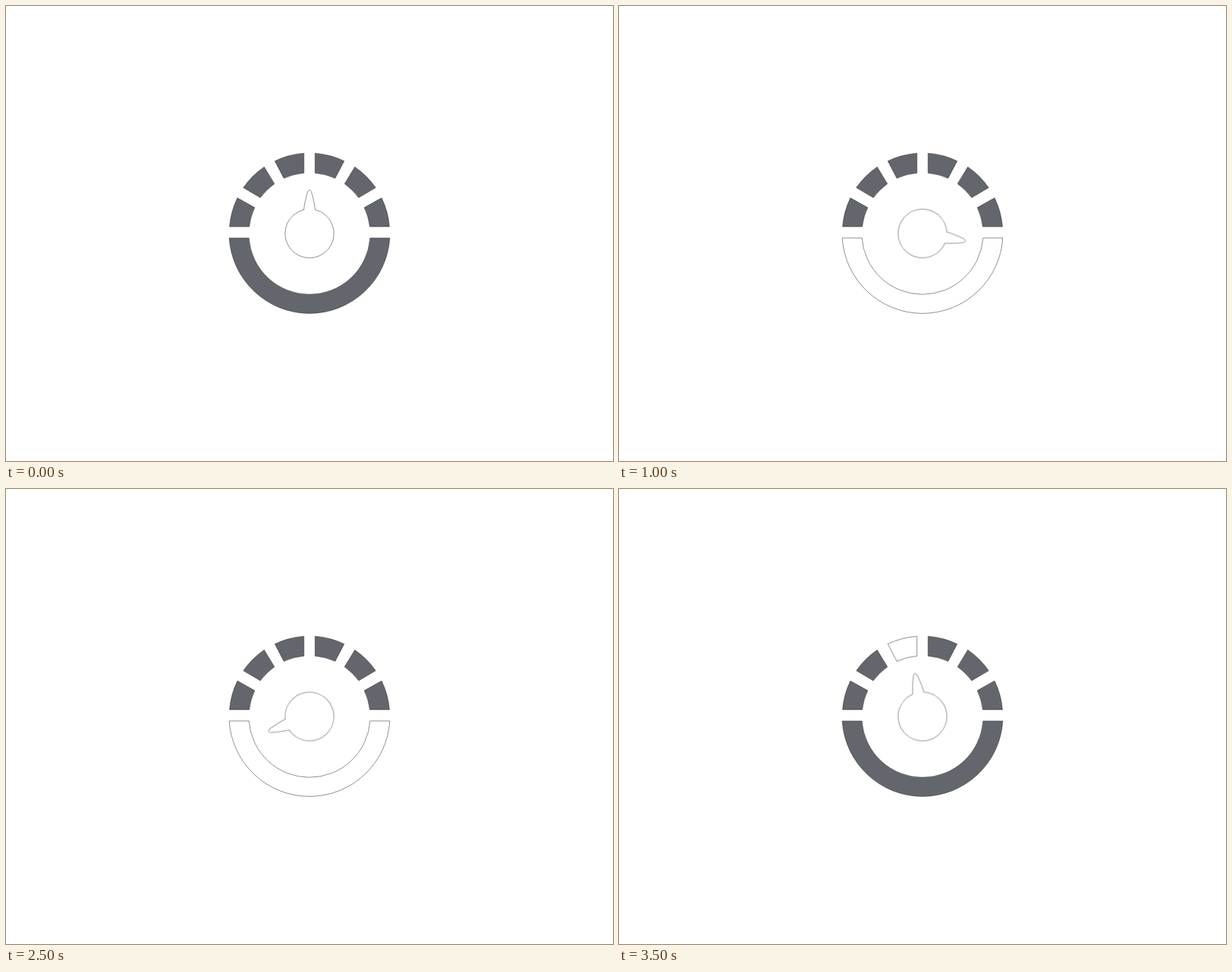
Recreate the animation shown at these times as an HTML page. Size 800 by 600 pixels, loop 3.6 s.

```html
<!DOCTYPE html>
<html lang="en">
<head>
<meta charset="utf-8">
<title>Dial</title>
<style>
  html, body { margin: 0; width: 100%; height: 100%; overflow: hidden; background: #fff; }
  svg { display: block; width: 800px; height: 600px; }
  path { stroke: #222; stroke-width: .5; }
  .part { fill: #64666d; }
  #knob { fill: #fff; }
</style>
</head>
<body>
<svg viewBox="-400 -300 800 600">
  <g id="ring"></g>
  <path id="knob" d="M-7.5 -31.2C-6.5 -40 -4 -50 -2.6 -54.5C-1.6 -58.2 1.6 -58.2 2.6 -54.5C4 -50 6.5 -40 7.5 -31.2A32.1 32.1 0 1 1 -7.5 -31.2Z"/>
</svg>
<script>
  const LOOP = 3600, STEPS = 36;
  const OUTER = 106, INNER = 80;
  const GREY = '#64666d', WHITE = '#fff';
  const ring = document.getElementById('ring');

  // Corners in order: outer start, outer end, inner end, inner start.
  const block = ([a, b, c, d], side) => {
    const at = ([x, y]) => `${x * side} ${y}`;
    const sweep = side > 0 ? 1 : 0;
    return `M${at(a)}A${OUTER} ${OUTER} 0 0 ${sweep} ${at(b)}` +
           `L${at(c)}A${INNER} ${INNER} 0 0 ${1 - sweep} ${at(d)}Z`;
  };

  const blocks = [
    [[7.3, -105.8], [45.7, -95.6], [33.8, -72.8], [7.3, -79.8]],
    [[59.7, -87.8], [87.2, -60.4], [64.8, -47.2], [46.2, -65.5]],
    [[95, -47], [105.4, -9], [79.4, -9], [72.2, -34.2]]
  ];
  const bowl = 'M-105.8 5.9A106 106 0 0 0 105.8 5.9L79.8 5.9A80 80 0 0 1 -79.8 5.9Z';

  const play = (el, frames) =>
    el.animate(frames.map(f => ({ ...f, easing: 'step-end' })),
      { duration: LOOP, iterations: Infinity }).startTime = 0;

  // The part turns white from step `on` until step `off`.
  const addPart = (d, on, off) => {
    const el = document.createElementNS('http://www.w3.org/2000/svg', 'path');
    el.setAttribute('d', d);
    el.setAttribute('class', 'part');
    ring.append(el);
    play(el, [
      { fill: GREY, offset: 0 },
      { fill: WHITE, offset: on / STEPS },
      { fill: GREY, offset: off / STEPS },
      { fill: GREY, offset: 1 }
    ]);
  };

  blocks.forEach((corners, i) => {
    const on = i * 3 + 1, off = on + 2;
    addPart(block(corners, 1), on, off);
    addPart(block(corners, -1), STEPS - off + 1, STEPS - on + 1);
  });
  addPart(bowl, 10, 27);

  play(document.getElementById('knob'), Array.from({ length: STEPS + 1 }, (_, i) =>
    ({ transform: `rotate(${i * 360 / STEPS}deg)`, offset: i / STEPS })));
</script>
</body>
</html>
```
